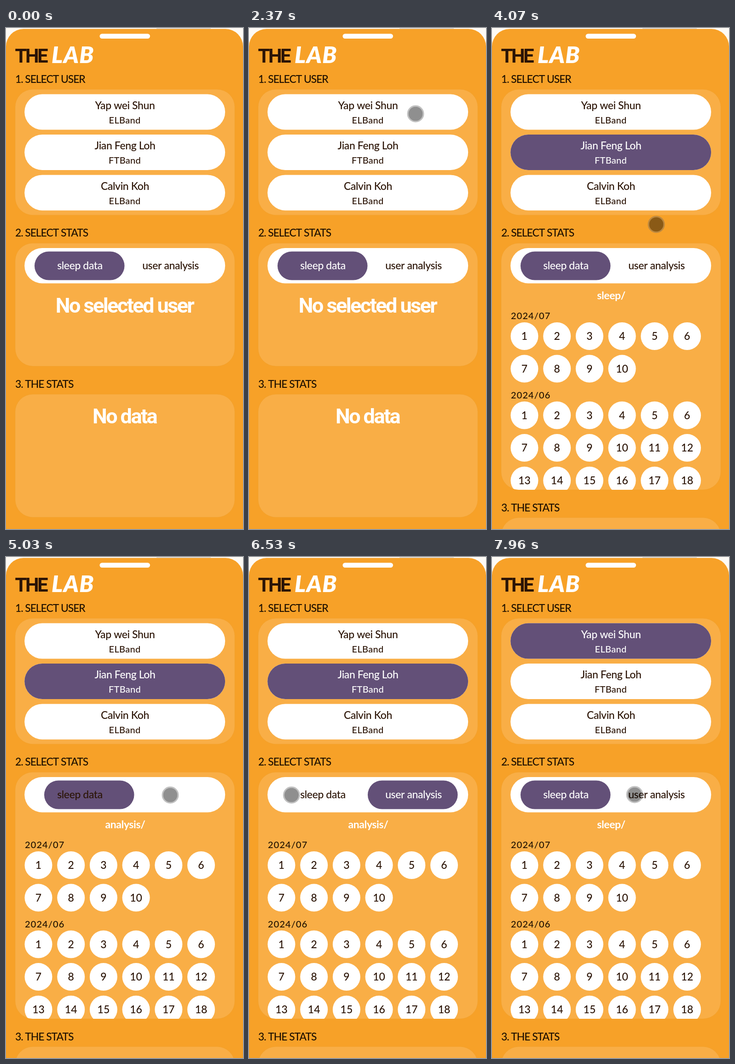
Write an HTML page with a canvas that moves like this. It is 515 by 1086 pixels and loops after 8 s.

```html
<!DOCTYPE html>
<html lang="en">
<head>
<meta charset="utf-8">
<title>The Lab</title>
<style>
  html, body { margin: 0; width: 100%; height: 100%; overflow: hidden; background: #fdfaf5; }
  canvas { display: block; }
</style>
</head>
<body>
<canvas id="stage" width="515" height="1086"></canvas>
<script>
const ctx = document.getElementById('stage').getContext('2d');
const LOOP = 8000;
const SANS = 'Lato, "Open Sans", sans-serif';
const BOLD = 'Roboto, "Liberation Sans", sans-serif';
const ORANGE = '#f7a128', PANEL = '#f9ae46', PURPLE = '#635078';
const WHITE = '#fff', DARK = '#2b1406', INK = '#1e1000';

const users = [
  ['Yap wei Shun', 'ELBand'],
  ['Jian Feng Loh', 'FTBand'],
  ['Calvin Koh', 'ELBand']
];

// Moments when a tap takes effect, and when its transition began
const pickSecond = { at: 3040, from: 2960 };
const toAnalysis = { at: 5030, from: 4970 };
const toSleep = { at: 6600, from: 6520 };
const pickFirst = { at: 7420, from: 7420 };

// Pointer path: time, x, y
const path = [
  [330, 506, 790], [540, 480, 640], [800, 405, 400], [1020, 364.5, 278], [1090, 365, 248],
  [1150, 365.5, 248], [1560, 362, 186], [2370, 362, 186], [2900, 351, 256],
  [3420, 351, 256], [3800, 356, 350], [4070, 357, 425.5], [4630, 357, 516],
  [5030, 357, 516], [5100, 354, 516], [5780, 354, 516], [6550, 92, 516],
  [6700, 92, 516], [7400, 327, 198], [7490, 327, 198], [7960, 310, 515]
];

const clamp = v => Math.max(0, Math.min(1, v));

function progress(t, tap) {
  if (t < tap.at) return 0;
  const p = clamp((t - tap.from) / 300);
  return p * p * (3 - 2 * p);
}

function slope(i, axis) {
  const rate = k => (path[k + 1][axis] - path[k][axis]) / (path[k + 1][0] - path[k][0]);
  const last = path.length - 1;
  if (i === 0) return rate(0);
  if (i === last) return 0;
  const a = rate(i - 1), b = rate(i);
  return a * b <= 0 ? 0 : 2 * a * b / (a + b);
}

// Monotone cubic interpolation along the pointer path
function pointerAt(t, axis) {
  let i = 0;
  while (i < path.length - 2 && t >= path[i + 1][0]) i++;
  const h = path[i + 1][0] - path[i][0];
  const u = clamp((t - path[i][0]) / h), u2 = u * u, u3 = u2 * u;
  return (2 * u3 - 3 * u2 + 1) * path[i][axis] + (3 * u2 - 2 * u3) * path[i + 1][axis]
    + h * ((u3 - 2 * u2 + u) * slope(i, axis) + (u3 - u2) * slope(i + 1, axis));
}

function shape(x, y, w, h, r) {
  ctx.beginPath();
  ctx.roundRect(x, y, w, h, r);
}

function box(x, y, w, h, r, color, alpha = 1) {
  ctx.globalAlpha = alpha;
  ctx.fillStyle = color;
  shape(x, y, w, h, r);
  ctx.fill();
  ctx.globalAlpha = 1;
}

function disc(x, y, r, color) {
  ctx.fillStyle = color;
  ctx.beginPath();
  ctx.arc(x, y, r, 0, Math.PI * 2);
  ctx.fill();
}

function text(str, x, y, font, color, align = 'center', spacing = 0) {
  ctx.font = font;
  ctx.letterSpacing = spacing + 'px';
  ctx.textAlign = align;
  ctx.fillStyle = color;
  ctx.fillText(str, x, y);
}

const label = (str, x, y, color, weight = 500) =>
  text(str, x, y, `${weight} 23px ${SANS}`, color, 'center', -0.4);
const heading = (str, y) => text(str, 20, y, `500 23px ${SANS}`, INK, 'left', -1.1);
const notice = (str, y) => text(str, 257.5, y, `700 45px ${BOLD}`, WHITE, 'center', -2.6);

function panel(y, h) {
  box(20, y, 477, h, 38, PANEL);
  ctx.strokeStyle = 'rgba(226,148,36,.2)';
  ctx.lineWidth = 1;
  ctx.stroke();
}

function drawHeader() {
  box(327, 0, 118, 2, 0, '#dedcd9');
  box(0, 2, 515, 1200, 38, ORANGE);
  box(203.5, 12.5, 109.5, 10.5, 5.2, WHITE);
  text('THE', 19.5, 75, `700 42px ${BOLD}`, DARK, 'left', -3.6);
  text('LAB', 99, 76, `italic 900 50px ${SANS}`, WHITE, 'left', 1.2);
}

function drawUsers(t) {
  heading('1. SELECT USER', 119);
  panel(133, 272.5);
  const swap = progress(t, pickFirst);
  const fill = [swap, progress(t, pickSecond) * (1 - swap), 0];
  const chosen = t >= pickFirst.at ? 0 : t >= pickSecond.at ? 1 : -1;
  users.forEach(([name, device], i) => {
    const y = 143.6 + i * 87.4;
    const color = i === chosen ? WHITE : DARK;
    box(40.2, y, 436, 77, 38.5, WHITE);
    box(40.2, y, 436, 77, 38.5, PURPLE, fill[i]);
    label(name, 258.5, y + 32.4, color);
    text(device, 258, y + 63.4, `500 20px ${SANS}`, color, 'center', 0.3);
  });
}

function drawMonth(title, y, days) {
  text(title, 41, y, `500 20px ${SANS}`, INK, 'left', 1.1);
  for (let d = 0; d < days; d++) {
    const x = 70.5 + (d % 6) * 70.7;
    const cy = y + 37 + Math.floor(d / 6) * 70.6;
    disc(x, cy, 30, WHITE);
    text(d + 1, x, cy + 8, `500 23px ${SANS}`, DARK);
  }
}

function drawStats(t) {
  const open = t >= pickSecond.at;
  const height = open ? 534.5 : 266.5;
  const analysis = t >= toAnalysis.at && t < toSleep.at;
  const slide = progress(t, toAnalysis) - progress(t, toSleep);

  heading('2. SELECT STATS', 452);
  panel(466.5, height);
  box(40.2, 477, 436, 76.5, 38.2, WHITE);
  box(62 + 196 * slide, 484.5, 195.5, 62, 31, PURPLE);
  label('sleep data', 160.5, 523, analysis ? DARK : WHITE);
  label('user analysis', 357.5, 523, analysis ? WHITE : DARK);

  if (!open) return notice('No selected user', 617);

  label(analysis ? 'analysis/' : 'sleep/', 259, 588, WHITE, 700);
  ctx.save();
  shape(20, 466.5, 477, height, 38);
  ctx.clip();
  drawMonth('2024/07', 631, 10);
  drawMonth('2024/06', 802.5, 18);
  ctx.restore();
  box(494, 466, 3, 304, 1.5, '#a5947b', 1 - clamp((t - 3830) / 180));
}

function drawResult(t) {
  const shift = t >= pickSecond.at ? 267.5 : 0;
  heading('3. THE STATS', 780 + shift);
  panel(794 + shift, 266.5);
  notice('No data', 857 + shift);
}

function drawPointer(t) {
  if (t < path[0][0]) return;
  const x = pointerAt(t, 1), y = pointerAt(t, 2);
  disc(x, y, 15.5, 'rgba(0,0,0,.44)');
  ctx.strokeStyle = 'rgba(100,100,100,.4)';
  ctx.lineWidth = 3;
  ctx.beginPath();
  ctx.arc(x, y, 17, 0, Math.PI * 2);
  ctx.stroke();
}

const start = performance.now();

function frame() {
  const t = (performance.now() - start) % LOOP;
  ctx.clearRect(0, 0, 515, 1086);
  drawHeader();
  drawUsers(t);
  drawStats(t);
  drawResult(t);
  drawPointer(t);
  requestAnimationFrame(frame);
}
frame();
</script>
</body>
</html>
```
